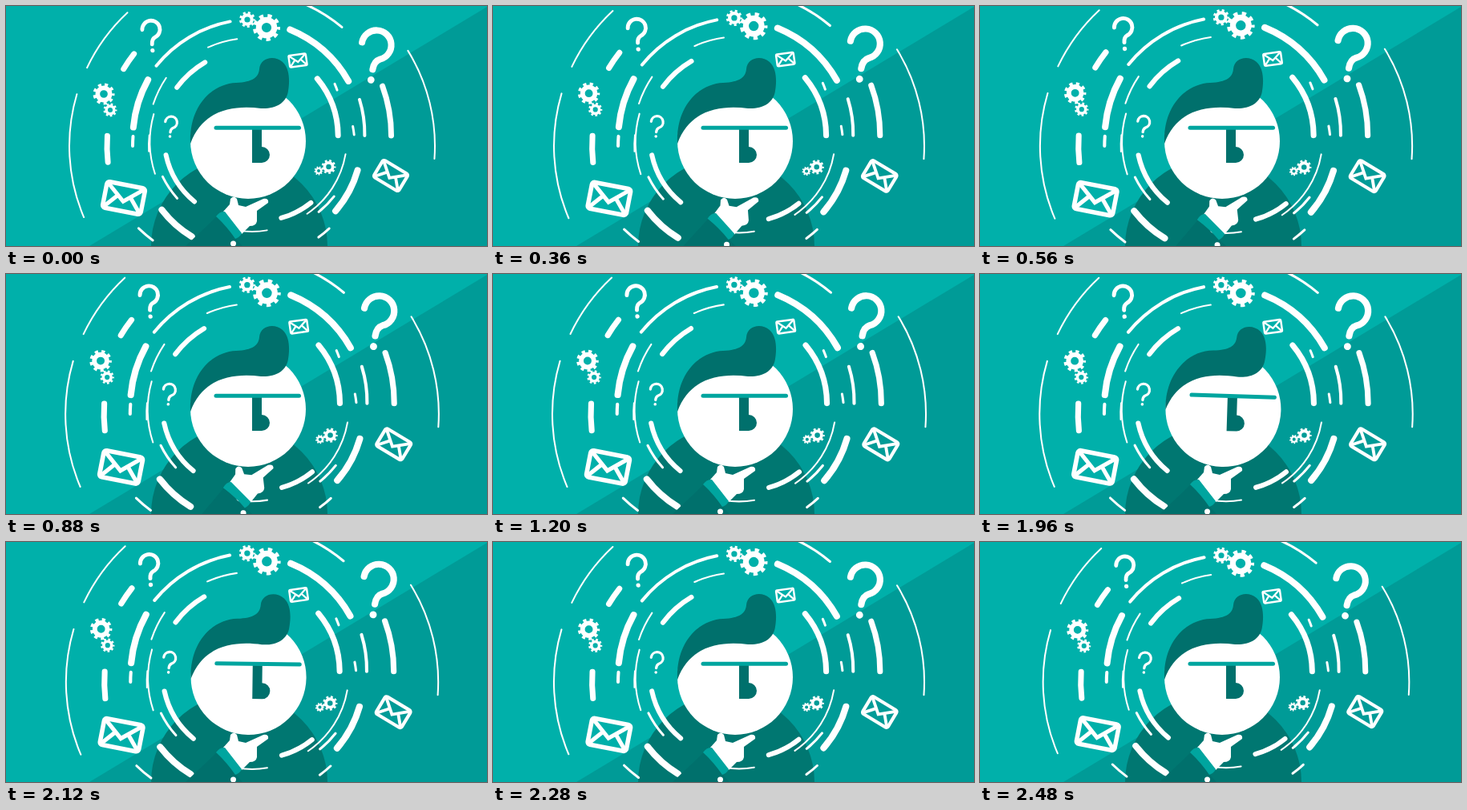
These frames come from a looping animation (600 px wide and 300 px high, 2.52 s). An HTML page:

```html
<!DOCTYPE html>
<html>
<head>
<meta charset="utf-8">
<style>
  html, body { margin: 0; width: 100%; height: 100%; overflow: hidden; background: #00b0aa; }
  svg { display: block; width: 600px; height: 300px; }
  #swirl { fill: none; stroke: #fff; stroke-linecap: round; }
  .dark { fill: #00706c; }
</style>
</head>
<body>
<svg viewBox="0 0 600 300">
  <path fill="#009b97" d="M104 300L600 1V300z"/>
  <circle cx="291" cy="300" r="110" fill="#007771"/>
  <g id="swirl"></g>
  <g id="head">
    <circle cx="302" cy="169" r="72" fill="#fff"/>
    <path class="dark" d="M230 172C228 124 258 97 287 96C308 95 315 89 316 79C317 64 335 61 345 70C354 78 354 94 352 106C350 122 335 129 318 128C286 124 246 128 230 172z"/>
    <path class="dark" d="M307 154H319V176A10 10 0 0 1 319 196H307z"/>
    <path d="M262 152.3H365.5" stroke="#00a59f" stroke-width="5" stroke-linecap="round"/>
  </g>
  <g id="hand">
    <path class="dark" d="M263 263L205 318L240 340H330L286 290z"/>
    <path fill="#fff" d="M271 257L279 248L280 241Q284 236 288 241L290 249L299 251L321 241Q328 240 327 246L313 256V269Q312 275 304 275L294 285z"/>
    <path fill="#00a59f" d="M262 263Q267 256 273 257L294 284Q292 289 286 291Q276 276 262 263z"/>
    <circle cx="283.5" cy="297" r="3.5" fill="#fff"/>
  </g>
</svg>
<script>
const LOOP = 2520, CX = 307, CY = 175;
const [swirl, head, hand] = ['swirl', 'head', 'hand'].map(id => document.getElementById(id));
const add = markup => swirl.insertAdjacentHTML('beforeend', markup);

const polar = (r, deg) => {
  const a = deg * Math.PI / 180;
  return `${CX + r * Math.cos(a)} ${CY + r * Math.sin(a)}`;
};

// Clockwise stroke around the swirl centre; its radius may drift along the way
function arc(width, r, from, to, drift = 0) {
  const mid = r + drift / 2;
  add(`<path stroke-width="${width}"
    d="M${polar(r, from)}A${mid} ${mid} 0 0 1 ${polar(r + drift, to)}"/>`);
}

const place = (x, y, angle, scale, shape) =>
  add(`<g transform="translate(${x} ${y}) rotate(${angle}) scale(${scale})">${shape}</g>`);

const gear = (x, y, r) => place(x, y, 0, r,
  `<circle r=".57" stroke-width=".42"/>
   <circle r=".86" stroke-width=".28" pathLength="16" stroke-dasharray="1 1"
     stroke-dashoffset=".5" stroke-linecap="butt"/>`);

const question = (x, y, angle, scale) => place(x, y, angle, scale,
  `<path d="M-10.5 -1A10.5 10.5 0 1 1 4 9Q0 11 0 17" stroke-width="4.6"/>
   <circle cy="24.5" r="2.5" fill="#fff" stroke="none"/>`);

const envelope = (x, y, angle, scale) => place(x, y, angle, scale,
  `<rect x="-11" y="-7.5" width="22" height="15" rx="1.5" stroke-width="2.5"/>
   <path d="M-10 -6.5L0 2L10 -6.5M-10 6.5L-4 -.5M10 6.5L4 -.5" stroke-width="2.3"/>`);

// Outer rings
arc(2, 228, 157, 196.5);
arc(2, 228, 205.4, 227);
arc(2, 228, 328.5, 364);
arc(3, 189, 291, 307, -3);
arc(7, 187, 211, 218);
arc(7, 181, 173.6, 184);
arc(7, 179, 335.3, 355.7, -5);
arc(3, 171, 136.4, 144, 4);

// Middle rings
arc(4, 156, 220, 260, 2);
arc(8, 150, 189, 212.5, 4);
arc(8, 153, 288, 326, -8);
arc(4, 149, 180, 184.6);
arc(4, 146, 336.6, 354.7, -5);
arc(3, 141, 47, 54);
arc(8, 136, 123.6, 144.7, 2);
arc(2, 135, 246, 262);
arc(2, 134, 203, 218.5, 3);
arc(8, 135, 13, 38, -3);

// Inner rings
arc(2, 129, 177, 186);
arc(3, 129, 323, 326.6, -2);
arc(3, 128, 349, 353.7);
arc(2, 126, 164, 198, 3);
arc(3, 120, 31.7, 44.7, -3);
arc(6, 119, 218, 240.7, 1);
arc(7, 117, 314, 353, -9);
arc(2, 117, 5, 51, -8);
arc(3, 114, 145, 161, 4);
arc(2, 107, 80, 100);
arc(6, 102, 44, 68, -5);
arc(6, 100, 136, 174, 8);

gear(325, 27, 17);
gear(301, 17, 10);
gear(122, 110, 13.5);
gear(130, 130, 8.5);
gear(402.5, 201, 9);
gear(390, 206, 5.5);
question(181, 30, -4, 1.05);
question(462, 50, 9, 1.75);
question(206, 146, 5, .7);
envelope(147, 240, 11, 2.2);
envelope(480, 212, 31, 1.65);
envelope(364, 68, -8, .98);

const ramp = (t, a, b) => Math.min(1, Math.max(0, (t - a) / (b - a)));
const smooth = u => u * u * (3 - 2 * u);
// Eases in over a..b, holds, and eases back over c..d
const pulse = (t, a, b, c, d) => smooth(ramp(t, a, b)) - smooth(ramp(t, c, d));

function draw() {
  const t = performance.now() % LOOP;
  const grow = t < 1440 ? 1 - (1 - ramp(t, 90, 1440)) ** 4 : 1 - ramp(t, 1440, 2500) ** 4;
  const reach = pulse(t, 100, 540, 880, 1200);
  const tilt = pulse(t, 1500, 1820, 1940, 2260);
  swirl.setAttribute('transform',
    `translate(${CX} ${CY}) scale(${1 + .022 * grow}) translate(${-CX} ${-CY})`);
  hand.setAttribute('transform',
    `translate(${6 * reach} ${2 * reach}) rotate(${-6.5 * reach} 284 239)`);
  head.setAttribute('transform', `rotate(${1.8 * tilt} 301 215)`);
  requestAnimationFrame(draw);
}
draw();
</script>
</body>
</html>
```
